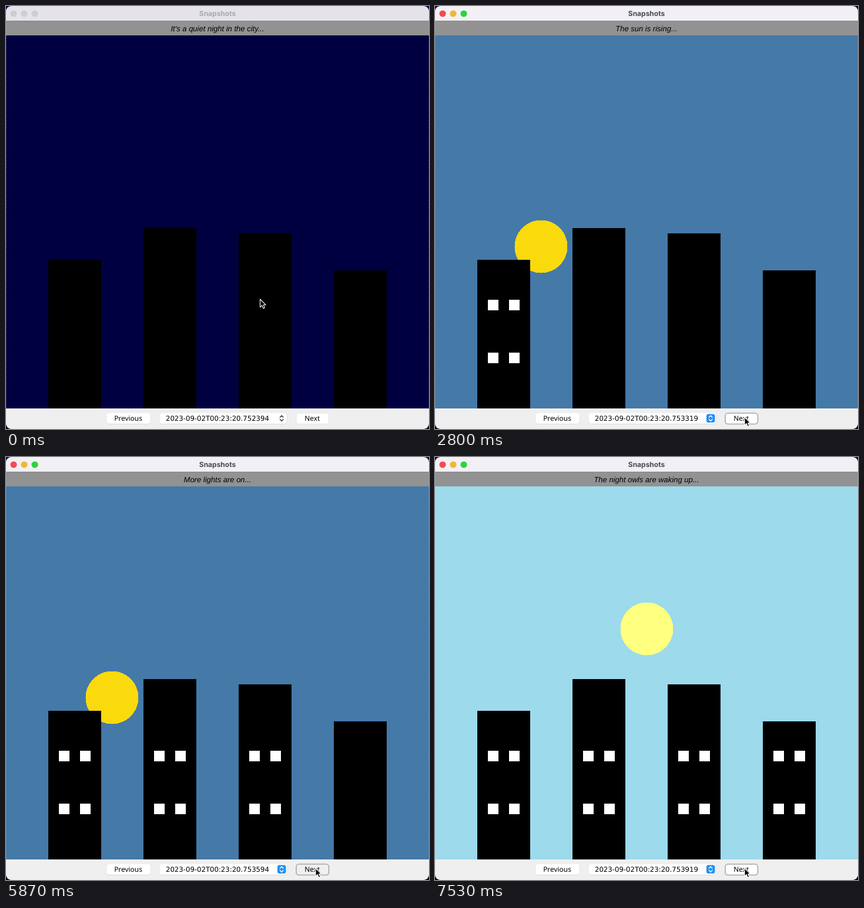
These frames come from a looping animation (720x720 px, 8000 ms). An HTML page:

```html
<!DOCTYPE html>
<html lang="en">
<head>
<meta charset="utf-8">
<title>Snapshots</title>
<style>
  html, body { margin: 0; width: 100%; height: 100%; overflow: hidden; background: #170b45; }
  svg { display: block; width: 100vw; height: 100vh; }
  text { text-anchor: middle; text-rendering: geometricPrecision; }
  .title { font: 700 12px Inter, sans-serif; }
  .caption { font: italic 13px "Liberation Sans", Arial, sans-serif; }
  .button { font: 500 11.9px "Noto Sans", sans-serif; }
  .stamp { font: 11.7px "DejaVu Sans", sans-serif; text-anchor: start; }
  .crisp { shape-rendering: crispEdges; }
</style>
</head>
<body>
<svg viewBox="0 0 720 720">
  <defs>
    <clipPath id="frame"><rect width="720" height="720" rx="9"/></clipPath>
  </defs>
  <rect y="360" width="720" height="360" fill="#08070f"/>
  <g clip-path="url(#frame)">
    <rect id="bar" width="720" height="26"/>
    <g id="lights"></g>
    <text id="title" class="title" x="360" y="17">Snapshots</text>
    <rect y="25" width="720" height="25" fill="#929292"/>
    <rect y="25" width="720" height="1" fill="#858585"/>
    <text id="caption" class="caption" x="360" y="42.8"></text>
    <rect id="sky" y="50" width="720" height="635"/>
    <circle id="sun" class="crisp" r="45"/>
    <g id="city" class="crisp"></g>
    <path d="M.5 26V685M719.5 26V685" stroke="#fff" stroke-opacity=".25" stroke-dasharray="2 2"/>
    <rect y="685" width="720" height="35" fill="#efefef"/>
    <g id="controls"></g>
    <text class="button" x="208" y="706">Previous</text>
    <text id="stamp" class="stamp" x="272" y="706"></text>
    <rect id="stepper" x="462" y="694.5" width="14.5" height="14.5" rx="3.5" fill="#2391f3"/>
    <path id="chevrons" d="M466.4 700L469.2 697.2L472 700M466.4 703.6L469.2 706.4L472 703.6"
      fill="none" stroke-width="1.4" stroke-linecap="round" stroke-linejoin="round"/>
    <rect id="next" x="494" y="693" width="55.5" height="18.5" rx="4.5"/>
    <text class="button" x="521.3" y="706">Next</text>
  </g>
  <path id="cursor" d="M0 0V13.6L3.2 10.7L5.4 15.7L7.8 14.7L5.7 9.8H9.8Z"
    fill="#000" stroke="#fff" stroke-width="1.1" stroke-linejoin="round"/>
</svg>
<script>
const LOOP = 8000;
const ACTIVATED = 1330;
const NIGHT = "#000040", DAWN = "#4479a8", DAY = "#9cdaec";
const MOON = { x: 135.5, y: 454.5, fill: "#00056a" };
const LOW_SUN = { x: 180.5, y: 409.5, fill: "#fada0c" };
const HIGH_SUN = { x: 360.5, y: 292.5, fill: "#ffff80" };

const scenes = [
  { at: 0, caption: "It's a quiet night in the city...", micros: "752394", sky: NIGHT, sun: null, lit: 0 },
  { at: 1330, caption: "Early birds are up...", micros: "753200", sky: NIGHT, sun: MOON, lit: 1 },
  { at: 2800, caption: "The sun is rising...", micros: "753319", sky: DAWN, sun: LOW_SUN, lit: 1 },
  { at: 4800, caption: "More lights are on...", micros: "753594", sky: DAWN, sun: LOW_SUN, lit: 3 },
  { at: 6130, caption: "The sun has risen...", micros: "753714", sky: DAY, sun: HIGH_SUN, lit: 3 },
  { at: 7330, caption: "The night owls are waking up...", micros: "753919", sky: DAY, sun: HIGH_SUN, lit: 4 },
];
const presses = [[4530, 4800], [5870, 6130], [7070, 7330]];
const moves = [[530, 0.1], [600, 0.35], [670, 0.68], [730, 0.92], [800, 1]];

const $ = id => document.getElementById(id);

function add(parent, tag, attrs) {
  const node = document.createElementNS("http://www.w3.org/2000/svg", tag);
  set(node, attrs);
  parent.append(node);
  return node;
}

function set(node, attrs) {
  for (const key in attrs) node.setAttribute(key, attrs[key]);
}

const lights = [13, 31, 49].map(cx => add($("lights"), "circle", { cx, cy: 13, r: 5.6 }));

const windows = [432, 378, 387, 450].map((top, i) => {
  const left = 72 + 162 * i;
  add($("city"), "rect", { x: left, y: top, width: 90, height: 685 - top });
  const group = add($("city"), "g", { fill: "#fff" });
  for (const y of [500, 590])
    for (const dx of [18, 54])
      add(group, "rect", { x: left + dx, y, width: 18, height: 18 });
  return group;
});

for (const [x, width] of [[171, 75], [261.5, 216.5]]) {
  add($("controls"), "rect", { x: x - 0.5, y: 693, width: width + 1, height: 19, rx: 5, fill: "#d9d9d9" });
  add($("controls"), "rect", { x, y: 693, width, height: 18, rx: 4.5, fill: "#fff" });
}

function render(t) {
  const active = t >= ACTIVATED;
  const scene = scenes.findLast(s => t >= s.at);
  const pressed = presses.some(([down, up]) => t >= down && t < up);
  const travel = moves.findLast(([at]) => t >= at)?.[1] ?? 0;

  set($("bar"), { fill: active ? "#f2f0f5" : "#e5e3e8" });
  set($("title"), { fill: active ? "#4b494d" : "#aaa8ac" });
  ["#f24b55", "#f0b733", "#2bd341"].forEach((color, i) =>
    set(lights[i], { fill: active ? color : "#cfcdd2" }));

  $("caption").textContent = scene.caption;
  $("stamp").textContent = "2023-09-02T00:23:20." + scene.micros;
  set($("sky"), { fill: scene.sky });
  set($("sun"), { visibility: scene.sun ? "visible" : "hidden" });
  if (scene.sun) set($("sun"), { cx: scene.sun.x, cy: scene.sun.y, fill: scene.sun.fill });
  windows.forEach((group, i) => set(group, { visibility: i < scene.lit ? "visible" : "hidden" }));

  set($("stepper"), { visibility: active ? "visible" : "hidden" });
  set($("chevrons"), { stroke: active ? "#fff" : "#333" });
  set($("next"), {
    fill: pressed ? "#f0f0f0" : "#fff",
    stroke: active ? "#a5a7b0" : "#dcdcdc",
    "stroke-width": active ? 1.6 : 0.7,
  });
  set($("cursor"), { transform: `translate(${432.5 + 94.5 * travel} ${499 + 201 * travel})` });
}

const start = performance.now();
function tick() {
  render((performance.now() - start) % LOOP);
  requestAnimationFrame(tick);
}
tick();
</script>
</body>
</html>
```
